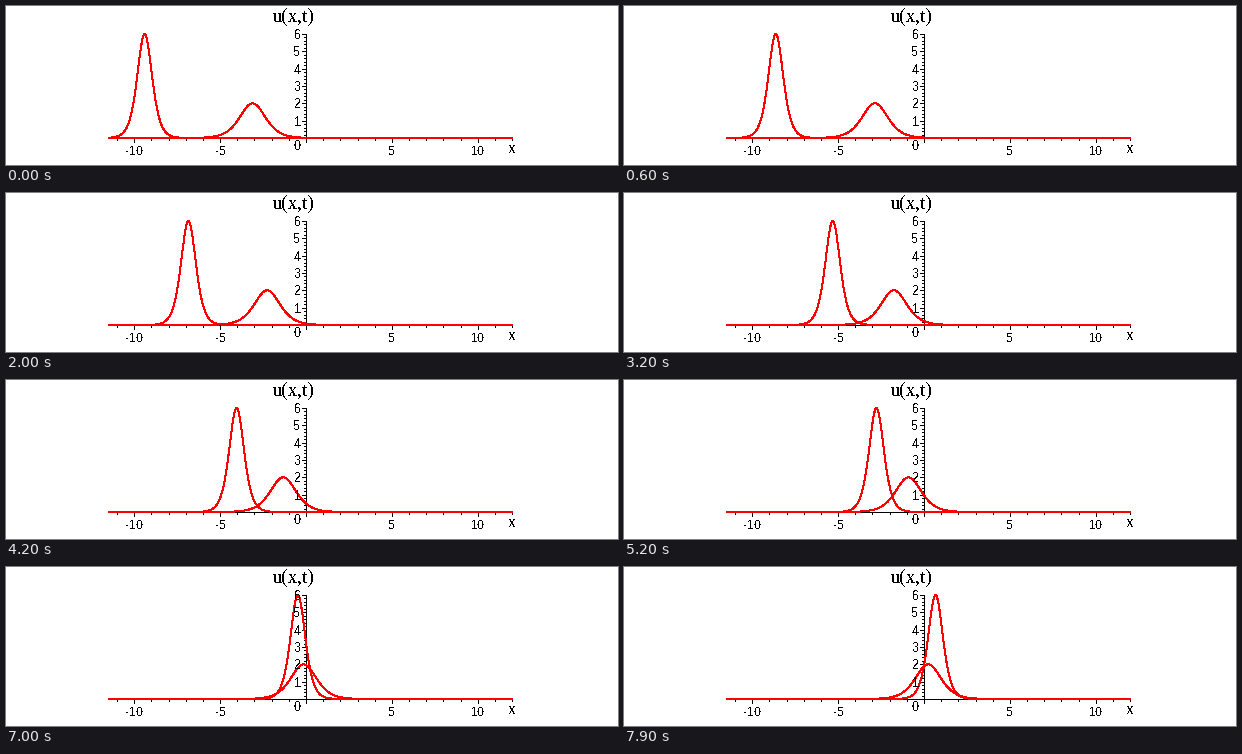
Animation, 612 px wide and 159 px high, one loop 8000 ms. Source, as a matplotlib script:

```python
import numpy as np
import matplotlib.pyplot as plt
from matplotlib.animation import FuncAnimation

W, H, DPI = 612, 159, 100
FRAMES, STEP_MS = 80, 100
PIXEL = 72 / DPI               # one pixel in points
X0, Y0 = 300.5, 132.0          # pixel position of the origin
SX, SY = 17.17, 104 / 6        # pixels per unit
T0, DT = -np.pi / 4, 0.01062

plt.rcParams["text.antialiased"] = False
plt.rcParams["text.hinting"] = "native"
plt.rcParams["text.hinting_factor"] = 1
plt.rcParams["path.simplify"] = False

fig = plt.figure(figsize=(W / DPI, H / DPI), dpi=DPI, facecolor="white")
ax = fig.add_axes([0, 0, 1, 1])
ax.set_xlim(0, W)
ax.set_ylim(H, 0)
ax.axis("off")


def px(x):
    return X0 + SX * x


def py(u):
    return Y0 - SY * u


def stroke(xs, ys, color):
    return ax.plot(xs, ys, color=color, lw=PIXEL, aa=False, snap=False,
                   solid_capstyle="butt")[0]


def segment(xs, ys):
    stroke(xs, ys, "black")


def label(x, y, text, size, family="Liberation Sans", ha="center"):
    ax.text(x, y, text, fontsize=size * PIXEL, family=family,
            ha=ha, va="baseline", color="black")


def draw_axes():
    segment([102, 506], [132.5, 132.5])
    segment([X0, X0], [28, 133])
    for n in range(-11, 13):
        length = 4 if n % 5 == 0 else 2
        x = np.floor(px(n)) + 0.5
        segment([x, x], [133, 133 + length])
    for n in range(31):
        length = 4 if n % 5 == 0 else 2
        y = np.round(py(n / 5)) + 0.5
        segment([300 - length, 300], [y, y])
    for n in (-10, -5, 5, 10):
        label(px(n), 149, str(n), 12)
    for n in range(1, 7):
        label(295, np.round(py(n)) + 5, str(n), 13, ha="right")
    label(295, 144, "0", 13, ha="right")
    label(288, 16, "u(x,t)", 20, "Liberation Serif")
    label(506, 147, "x", 17, "Liberation Serif")


def soliton(x, t, k2):
    """Single KdV soliton: height 2k^2, speed 4k^2."""
    return 2 * k2 / np.cosh(np.sqrt(k2) * (x - 4 * k2 * t)) ** 2


draw_axes()
grid = np.linspace(-11.55, 11.97, 900)
waves = [(k2, stroke([], [], "red")) for k2 in (3, 1)]


def update(i):
    t = T0 + i * DT
    for k2, line in waves:
        line.set_data(px(grid), py(soliton(grid, t, k2)))
    return [line for _, line in waves]


anim = FuncAnimation(fig, update, frames=FRAMES, interval=STEP_MS,
                     repeat=True, repeat_delay=0, blit=False)
plt.show()
```
